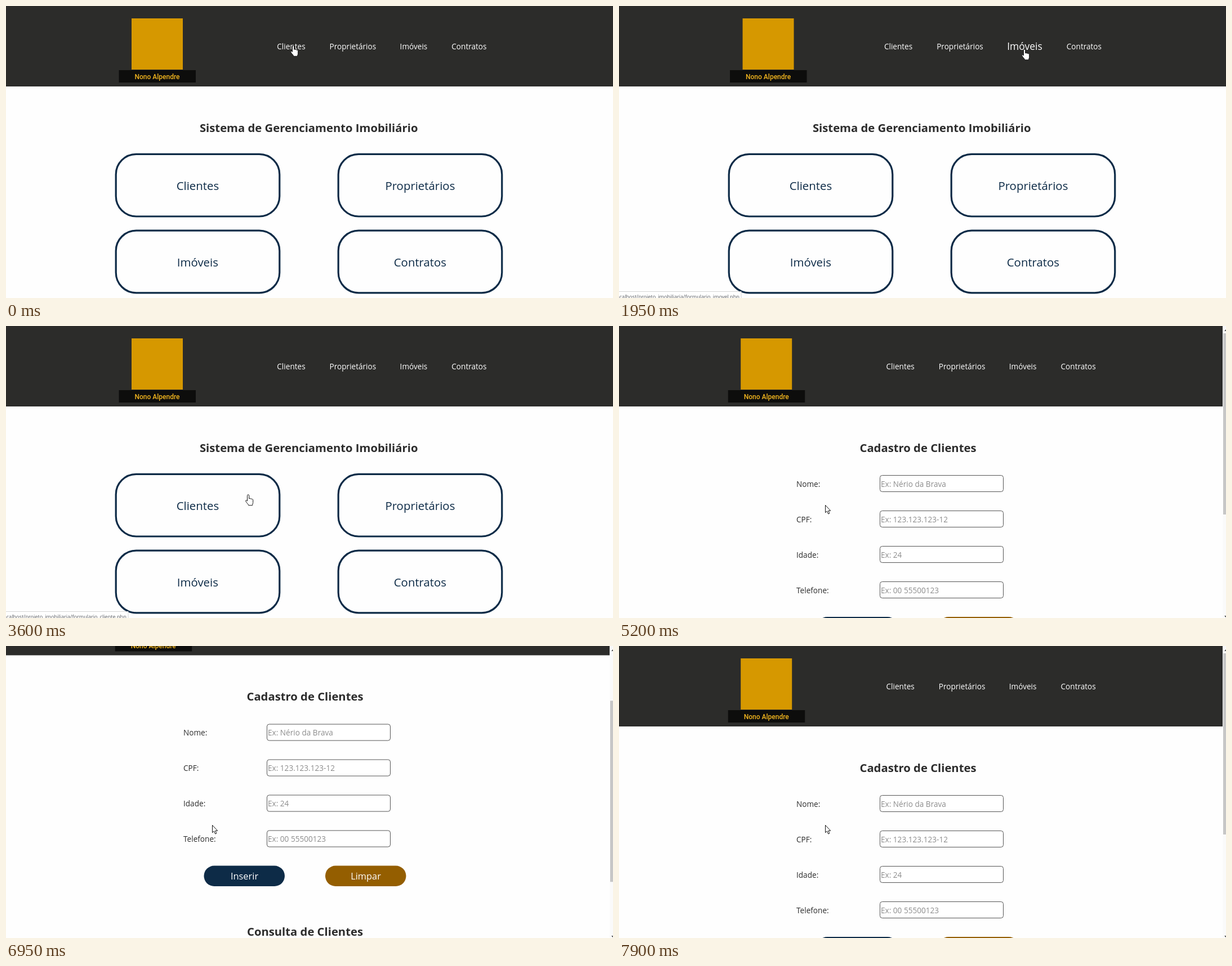
Recreate the animation shown at these times as an HTML page. Size 1078 px wide and 519 px high, loop 8 s.

```html
<!DOCTYPE html>
<html lang="pt-BR">
<head>
<meta charset="utf-8">
<title>Sistema de Gerenciamento Imobiliário</title>
<style>
  html, body { margin: 0; width: 100%; height: 100%; overflow: hidden; background: #fefefe; }
  svg { display: block; width: 1078px; height: 519px; font: 13.6px "Open Sans", "Noto Sans", sans-serif; }
  text { white-space: pre; }
  .title { font-size: 20.25px; font-weight: 700; fill: #2c2c2c; }
  .mid { text-anchor: middle; }
  .card { fill: none; stroke: #0d2b47; stroke-width: 3.2; }
  .card-text { font-size: 20.4px; fill: #0d2b47; }
  .label { fill: #2c2c2c; }
  .hint { fill: #8c8c8c; }
  .field { fill: #fff; stroke: #555; }
  .button { font-size: 16.4px; fill: #fff; }
  .cell { stroke: #111; }
  .cursor { fill: #fff; stroke: #111; stroke-width: 1; stroke-linejoin: round; }
</style>
</head>
<body>
<svg viewBox="0 0 1078 519">
  <rect width="1078" height="519" fill="#fefefe"/>
  <g id="page">
    <rect id="header" width="1078" height="143" fill="#2c2c2a"/>
    <g id="logo">
      <rect x="22.5" y="22" width="91" height="91" fill="#d69800"/>
      <rect y="114" width="136.5" height="22" fill="#0d0d0c"/>
      <text class="mid" x="68" y="130" font-family="Roboto, sans-serif" font-size="12" font-weight="500" fill="#f3b61f">Nono Alpendre</text>
    </g>
    <g id="nav" fill="#fff"></g>
    <g id="home"></g>
    <g id="form"></g>
  </g>
  <g id="scrollbar">
    <rect x="1072" width="6" height="519" fill="#fafafa"/>
    <rect id="thumb" x="1073" width="5" height="322" fill="#c6c6c6"/>
    <path d="M1075 9l3-3v3zM1075 515h3v3z" fill="#444"/>
  </g>
  <g id="status">
    <rect id="statusBox" x="-2" y="507.5" height="14" fill="#fff" stroke="#d4d4d4"/>
    <text id="statusText" x="-7" y="519.5" font-size="9.1" fill="#55585c"></text>
  </g>
  <g id="cursor" class="cursor">
    <path id="arrow" d="M0 0V13.2l3-2.7 2.2 5 2.2-1-2.1-4.7H9.2z"/>
    <path id="hand" d="M-1.5 11V1.5a1.6 1.6 0 0 1 3.2 0V7c.6-1 2.4-.8 2.6.4 .6-.8 2.2-.5 2.4.6 .8-.6 2 0 2 1.2v4.3c0 2-1 2.8-1.2 5.3h-6.700c-.3-2.200-3.400-4.200-5-7.300-.8-1.700 1-2.600 2.700-.5z"/>
  </g>
</svg>
<script>
const DURATION = 8000, STEP = 50;
const PAGE_LOAD = 4950;
const $ = id => document.getElementById(id);

function add(parent, tag, attrs, content = '') {
  const el = document.createElementNS('http://www.w3.org/2000/svg', tag);
  for (const key in attrs) el.setAttribute(key, attrs[key]);
  el.textContent = content;
  parent.appendChild(el);
  return el;
}
const label = (parent, x, y, content, cls = 'label') =>
  add(parent, 'text', { x, y, class: cls }, content);
const box = (parent, x, y, width, height, attrs) =>
  add(parent, 'rect', { x, y, width, height, ...attrs });

// Menu entries: width at rest, then the start and end of growing and shrinking
const GAP = 43, GROWTH = 0.285;
const links = [
  { name: 'Clientes', width: 50.3, grow: [50, 550], shrink: [750, 1100] },
  { name: 'Proprietários', width: 82, grow: [850, 1250], shrink: [1300, 1700] },
  { name: 'Imóveis', width: 48.7, grow: [1400, 1950], shrink: [2100, 2500] },
  { name: 'Contratos', width: 62.5, grow: [2150, 2550], shrink: [2900, 3350] }
];
for (const link of links) link.el = add($('nav'), 'text', {}, link.name);

function buildHome() {
  const home = $('home');
  label(home, 537.7, 223.8, 'Sistema de Gerenciamento Imobiliário', 'title mid');
  links.forEach((link, i) => {
    const x = 195.2 + 395 * (i % 2), y = 263.4 + 135.8 * (i >> 1);
    box(home, x, y, 290.6, 110.6, { rx: 36, class: 'card' });
    label(home, x + 145.2, y + 64, link.name, 'card-text mid');
  });
}

function buildForm() {
  const form = $('form');
  label(form, 531, 223.8, 'Cadastro de Clientes', 'title mid');
  const fields = [['Nome:', 'Nério da Brava'], ['CPF:', '123.123.123-12'], ['Idade:', '24'], ['Telefone:', '00 55500123']];
  fields.forEach(([name, example], i) => {
    const y = 265.5 + 63 * i;
    label(form, 315, y + 20, name);
    box(form, 463.5, y, 219, 29, { rx: 4, class: 'field' });
    label(form, 465, y + 20, 'Ex: ' + example, 'hint');
  });
  for (const [x, name, fill] of [[351.5, 'Inserir', '#0d2b47'], [567, 'Limpar', '#945e00']]) {
    box(form, x, 517, 143.5, 36.5, { rx: 18.2, fill });
    label(form, x + 72, 541.5, name, 'button mid');
  }

  label(form, 531, 641, 'Consulta de Clientes', 'title mid');
  box(form, 136.5, 668.5, 789.5, 110, { fill: '#fff', class: 'cell' });
  const columns = [
    [139.5, 182.5, 'Nome', 'Nilce T Bravim'],
    [325.5, 194, 'CPF', '123.456.731-11'],
    [522.5, 104.5, 'Idade', '45 anos'],
    [630.5, 183.5, 'Telefone', '(00)5550-0123'],
    [817.5, 105, 'Opções', '']
  ];
  for (const [x, width, name, value] of columns) {
    box(form, x, 673, width, 22.5, { fill: '#9999ff', class: 'cell' });
    label(form, x + width / 2, 689.5, name, 'label mid').setAttribute('font-weight', 700);
    box(form, x, 699.5, width, 38, { fill: '#fff', class: 'cell' });
    label(form, x + 3.5, 724.5, value);
  }
  const pencil = add(form, 'g', { transform: 'translate(837 725) rotate(-45)' });
  add(pencil, 'path', { d: 'M0 0l5-3v6z', fill: '#333' });
  box(pencil, 5, -3, 14, 6, { fill: '#e8741c' });
  box(pencil, 19, -3, 4, 6, { fill: '#b9472b' });
  add(form, 'path', {
    d: 'M886 717.5a8.5 8.5 0 1 0 17 0a8.5 8.5 0 1 0-17 0M891 714l7 7m0-7l-7 7',
    fill: 'none', stroke: '#1f4a6b', 'stroke-width': 1.3
  });
}

const urls = { cliente: 217, proprietario: 240, imovel: 217, contrato: 227 };
const statusTimes = [[0, ''], [100, 'cliente'], [900, 'proprietario'], [1450, 'imovel'],
  [2200, 'contrato'], [3250, ''], [3550, 'cliente'], [5200, '']];
const scrollTimes = [[0, 0], [5950, 6.5], [6100, 52], [6150, 60], [6450, 66.5], [6500, 88], [6550, 106],
  [6600, 116], [6650, 120], [6950, 126.5], [7100, 178], [7250, 187], [7300, 199], [7350, 207],
  [7400, 204.5], [7500, 150], [7550, 112], [7650, 50], [7750, 8], [7900, 0]];
const cursorTimes = [[0, 510, 70.5], [750, 510, 70.5], [950, 580, 76], [1200, 660, 72], [1300, 704, 69],
  [1550, 716, 75], [2150, 722, 78], [2400, 782, 86], [2600, 783.5, 87.5], [2950, 790, 96],
  [3350, 640, 215], [3600, 430, 300], [3750, 382, 310], [4500, 382, 310], [4550, 366.5, 318.5]];
const handTimes = [[0, true], [750, false], [850, true], [1250, false], [1400, true], [2050, false],
  [2200, true], [3000, false], [3600, true], [4750, false]];

const hold = (list, t) => list.filter(key => key[0] <= t).pop()[1];

function glide(list, t) {
  const next = list.findIndex(key => key[0] > t);
  if (next < 0) return list[list.length - 1].slice(1);
  const [a, b] = [list[next - 1], list[next]];
  const k = (t - a[0]) / (b[0] - a[0]);
  return [1, 2].map(i => a[i] + (b[i] - a[i]) * k);
}

function ease(t, [from, to]) {
  const k = Math.min(1, Math.max(0, (t - from) / (to - from)));
  return k * k * (3 - 2 * k);
}

const show = (id, visible) => $(id).setAttribute('display', visible ? 'inline' : 'none');

function drawHeader(t, onForm) {
  const amounts = links.map(link => ease(t, link.grow) - ease(t, link.shrink));
  const extra = links.reduce((sum, link, i) => sum + link.width * GROWTH * amounts[i], 0);
  const shift = onForm ? -6.8 : 0;
  $('header').setAttribute('width', onForm ? 1072 : 1078);
  $('logo').setAttribute('transform', `translate(${200.5 + shift - extra / 4} 0)`);
  let x = 481.3 + shift - extra * 0.75;
  links.forEach((link, i) => {
    const scale = 1 + GROWTH * amounts[i];
    link.el.setAttribute('x', x);
    link.el.setAttribute('y', 76.8 + 1.5 * amounts[i]);
    link.el.setAttribute('font-size', 13.6 * scale);
    x += link.width * scale + GAP;
  });
}

function draw(time) {
  const t = Math.floor(time / STEP) * STEP;
  const onForm = t >= PAGE_LOAD;
  show('home', !onForm);
  show('form', onForm);
  show('scrollbar', onForm);
  drawHeader(t, onForm);

  const scroll = hold(scrollTimes, t);
  $('page').setAttribute('transform', `translate(0 ${-scroll})`);
  $('thumb').setAttribute('y', 13 + scroll * 0.666);

  const target = hold(statusTimes, t);
  show('status', target);
  if (target) {
    $('statusBox').setAttribute('width', urls[target] + 2);
    $('statusText').textContent = `localhost/projeto_imobiliaria/formulario_${target}.php`;
  }

  const hand = hold(handTimes, t);
  show('hand', hand);
  show('arrow', !hand);
  $('cursor').setAttribute('transform', `translate(${glide(cursorTimes, t).join(' ')})`);
}

buildHome();
buildForm();
const start = performance.now();
function tick() {
  draw((performance.now() - start) % DURATION);
  requestAnimationFrame(tick);
}
tick();
</script>
</body>
</html>
```
